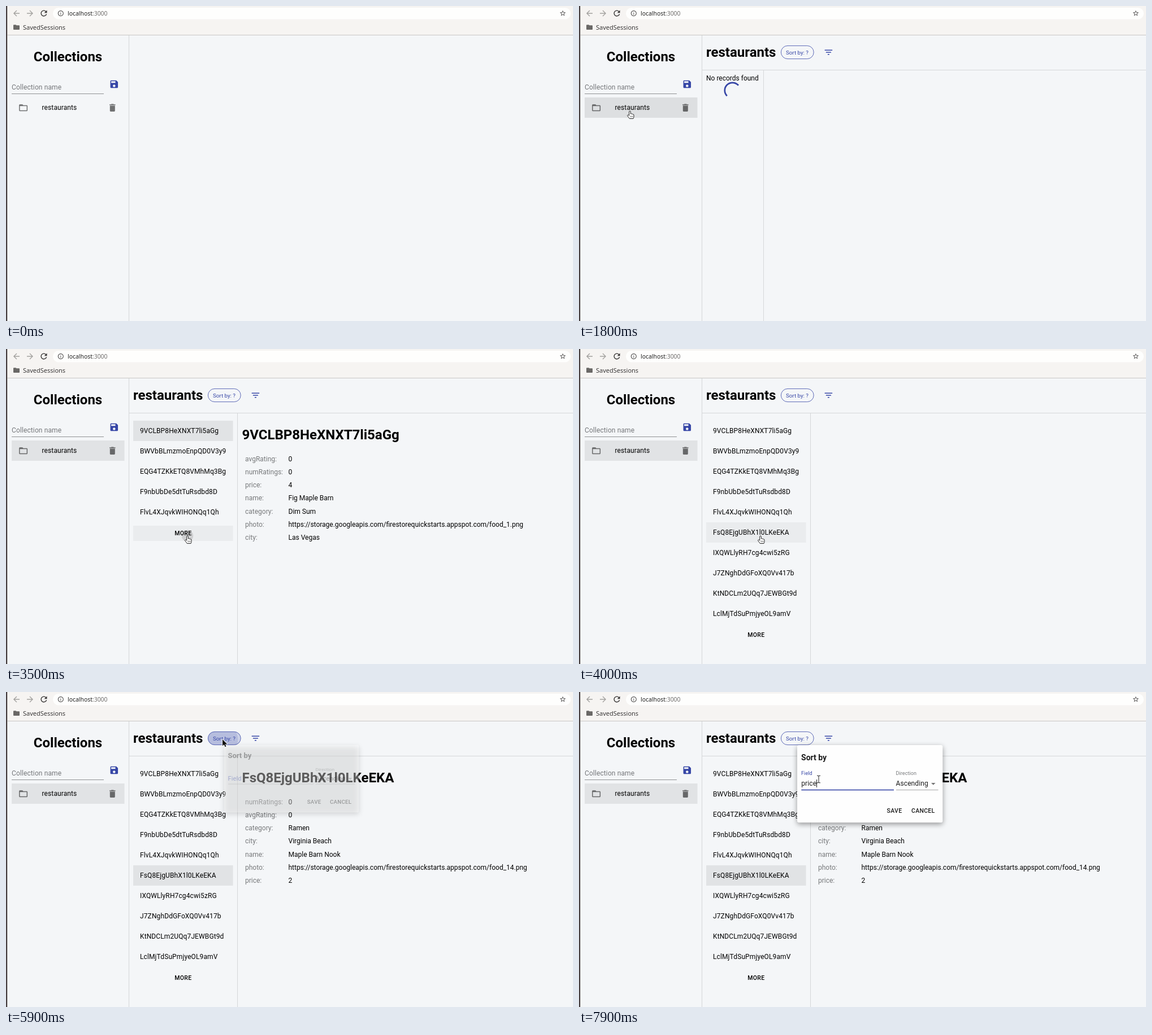
Animation of 1003 by 558 pixels, one loop 8 s. Source, as an HTML page with a canvas:

```html
<!DOCTYPE html>
<html lang="en">
<head>
<meta charset="utf-8">
<title>Collections</title>
<style>
html, body { margin: 0; width: 100%; height: 100%; overflow: hidden; background: #f4f6f8; }
canvas { display: block; width: 1003px; height: 558px; }
</style>
</head>
<body>
<canvas id="stage"></canvas>
<script>
const W = 1003, H = 558, LOOP = 8000, STEP = 100;
const PRIMARY = '#3646a6', BG = '#f4f6f8', LINE = '#d5d7d9', MUTED = 'rgba(0,0,0,.54)';
const FONT = 'Roboto, sans-serif', UI = '"Noto Sans", "Open Sans", sans-serif';
const SPACED = 0.1125;

const canvas = document.getElementById('stage');
const ctx = canvas.getContext('2d');
const dpr = window.devicePixelRatio || 1;
canvas.width = W * dpr;
canvas.height = H * dpr;

const ICONS = {
  back: 'M20 11H7.83l5.59-5.59L12 4l-8 8 8 8 1.41-1.41L7.83 13H20v-2z',
  forward: 'M12 4l-1.41 1.41L16.17 11H4v2h12.17l-5.58 5.59L12 20l8-8z',
  reload: 'M17.65 6.35C16.2 4.9 14.21 4 12 4c-4.42 0-7.99 3.58-7.99 8s3.57 8 7.99 8c3.73 0 6.84-2.55 7.73-6h-2.08c-.82 2.33-3.04 4-5.65 4-3.31 0-6-2.69-6-6s2.69-6 6-6c1.66 0 3.14.69 4.22 1.78L13 11h7V4l-2.35 2.35z',
  info: 'M11 17h2v-6h-2v6zm1-15C6.48 2 2 6.48 2 12s4.48 10 10 10 10-4.48 10-10S17.52 2 12 2zm0 18c-4.41 0-8-3.59-8-8s3.59-8 8-8 8 3.59 8 8-3.59 8-8 8zM11 9h2V7h-2v2z',
  star: 'M22 9.24l-7.19-.62L12 2 9.19 8.63 2 9.24l5.46 4.73L5.82 21 12 17.27 18.18 21l-1.63-7.03L22 9.24zM12 15.4l-3.76 2.27 1-4.28-3.32-2.88 4.38-.38L12 6.1l1.71 4.04 4.38.38-3.32 2.88 1 4.28L12 15.4z',
  folder: 'M10 4H4c-1.1 0-1.99.9-1.99 2L2 18c0 1.1.9 2 2 2h16c1.1 0 2-.9 2-2V8c0-1.1-.9-2-2-2h-8l-2-2z',
  folderOpen: 'M20 6h-8l-2-2H4c-1.1 0-1.99.9-1.99 2L2 18c0 1.1.9 2 2 2h16c1.1 0 2-.9 2-2V8c0-1.1-.9-2-2-2zm0 12H4V8h16v10z',
  save: 'M17 3H5c-1.11 0-2 .9-2 2v14c0 1.1.89 2 2 2h14c1.1 0 2-.9 2-2V7l-4-4zm-5 16c-1.66 0-3-1.34-3-3s1.34-3 3-3 3 1.34 3 3-1.34 3-3 3zm3-10H5V5h10v4z',
  trash: 'M6 19c0 1.1.9 2 2 2h8c1.1 0 2-.9 2-2V7H6v12zM19 4h-3.5l-1-1h-5l-1 1H5v2h14V4z',
  filter: 'M10 18h4v-2h-4v2zM3 6v2h18V6H3zm3 7h12v-2H6v2z'
};
for (const k in ICONS) ICONS[k] = new Path2D(ICONS[k]);

const HAND = new Path2D('M-1.3 1.2Q-1.3 0 0 0Q1.3 0 1.3 1.2V5Q2.3 4.2 3.2 5.3Q4.4 4.6 5.2 5.9Q6.9 5.5 7 7.2V10Q7 11.5 6 13.5H-.7Q-2 11.5-4.3 8.6Q-4.8 7.3-3.4 7Q-2.2 7-1.3 8.2Z');
const HAND_LINES = new Path2D('M1 8.5V11.3M2.9 8.5V11.3M4.8 8.5V11.3');
const ARROW = new Path2D('M0 0V11.6L2.7 9.1 4.6 13.2 6.5 12.4 4.7 8.5H8.4Z');
const BEAM = new Path2D('M-3-6.3H-1Q0-6.3 0-5Q0-6.3 1-6.3H3M0-5V5M-3 6.3H-1Q0 6.3 0 5Q0 6.3 1 6.3H3');

const IDS = ['9VCLBP8HeXNXT7li5aGg', 'BWVbBLmzmoEnpQD0V3y9', 'EQG4TZKkETQ8VMhMq3Bg',
  'F9nbUbDe5dtTuRsdbd8D', 'FlvL4XJqvkWIHONQq1Qh', 'FsQ8EjgUBhX1l0LKeEKA',
  'IXQWLlyRH7cg4cwi5zRG', 'J7ZNghDdGFoXQ0Vv417b', 'KtNDCLm2UQq7JEWBGt9d', 'LclMjTdSuPmjyeOL9amV'];
const PHOTO = 'https://storage.googleapis.com/firestorequickstarts.appspot.com/';
const RECORDS = {
  0: { avgRating: 0, numRatings: 0, price: 4, name: 'Fig Maple Barn', category: 'Dim Sum',
    photo: PHOTO + 'food_1.png', city: 'Las Vegas' },
  5: { numRatings: 0, avgRating: 0, category: 'Ramen', city: 'Virginia Beach', name: 'Maple Barn Nook',
    photo: PHOTO + 'food_14.png', price: 2 }
};

// Moments of the story, in ms
const T = { header: 1500, list: 2000, pick1: 2700, more: 3700, pick2: 4500, dialog: 5818, focus: 6500 };

// Pointer path: time, x, y
const PATH = [[500, 150, 93], [600, 143, 110], [700, 130, 135], [800, 114, 152], [900, 97, 176], [1000, 90, 186],
  [1900, 90, 186], [2100, 165, 168], [2300, 285, 149], [2400, 300, 148], [2600, 302, 152], [2700, 320, 195],
  [2800, 332, 242], [2900, 328, 282], [3000, 324, 315], [3200, 321, 335], [3500, 321, 331], [4700, 321, 331],
  [4900, 322, 325], [5000, 342, 230], [5100, 366, 131], [5200, 373, 117], [5400, 382, 91], [5500, 383, 84],
  [6000, 383, 84], [6200, 398, 118], [6400, 424, 154.5]];

const clamp = v => Math.max(0, Math.min(1, v));

// cubic-bezier(x1, 0, x2, 1)
function ease(x, x1 = 0.4, x2 = 0.2) {
  x = clamp(x);
  let lo = 0, hi = 1, s = x;
  for (let i = 0; i < 24; i++) {
    s = (lo + hi) / 2;
    const bx = 3 * (1 - s) * (1 - s) * s * x1 + 3 * (1 - s) * s * s * x2 + s * s * s;
    if (bx < x) lo = s; else hi = s;
  }
  return s * s * (3 - 2 * s);
}

function pointer(t) {
  if (t < 500 || (t >= 6700 && t < 7900)) return null;
  let i = 0;
  while (i < PATH.length - 1 && PATH[i + 1][0] <= t) i++;
  const a = PATH[i], b = PATH[i + 1];
  if (!b) return { x: a[1], y: a[2] };
  const k = (t - a[0]) / (b[0] - a[0]);
  return { x: a[1] + (b[1] - a[1]) * k, y: a[2] + (b[2] - a[2]) * k };
}

const rowCount = t => t < T.list ? 0 : t < T.more ? 5 : 10;
const rowBox = i => [225, 127 + 36 * i, 176.5, 36];
const moreBox = t => [225, 133 + 36 * rowCount(t), 176.5, 27];
const COLLECTION = [10, 162, 199.5, 36], INPUT = [10, 130, 163, 26], CHIP = [357, 70, 58.5, 24];
const FIELD = [393, 148, 164, 26];

function zone(t) {
  const p = pointer(t);
  if (!p) return '';
  const over = ([x, y, w, h]) => p.x >= x && p.x < x + w && p.y >= y && p.y < y + h;
  if (t >= T.dialog) return over(FIELD) ? 'field' : '';
  if (over(INPUT)) return 'input';
  if (over(COLLECTION)) return 'collection';
  if (t >= T.header && over(CHIP)) return 'chip';
  const n = rowCount(t);
  for (let i = 0; i < n; i++) if (over(rowBox(i))) return 'row' + i;
  return n && over(moreBox(t)) ? 'more' : '';
}

const hover = (t, z) => ((zone(t) === z) + (zone(t - STEP) === z)) / 2;

function text(s, x, y, { size = 12, weight = 400, color = '#000', font = FONT, gap = 0, align = 'left' } = {}) {
  ctx.font = `${weight} ${size}px ${font}`;
  ctx.letterSpacing = gap + 'px';
  ctx.textAlign = align;
  ctx.fillStyle = color;
  ctx.fillText(s, x, y);
}

function rect(x, y, w, h, color) {
  ctx.fillStyle = color;
  ctx.fillRect(x, y, w, h);
}

const shade = (box, a) => a > 0 && rect(...box, `rgba(0,0,0,${a})`);

function icon(name, x, y, scale, color) {
  ctx.save();
  ctx.translate(x, y);
  ctx.scale(scale, scale);
  ctx.fillStyle = color;
  ctx.fill(ICONS[name], 'evenodd');
  ctx.restore();
}

function pill(x, y, w, h, r) {
  ctx.beginPath();
  ctx.roundRect(x, y, w, h, r);
}

function ripple(t, start, cx, cy, box, color = '#000', radius = 0) {
  const age = t - start;
  if (age < 0 || age > 650) return;
  const [x, y, w, h] = box;
  const grow = ease(age / 550);
  const full = Math.hypot(Math.max(cx - x, x + w - cx), Math.max(cy - y, y + h - cy));
  ctx.save();
  pill(x, y, w, h, radius);
  ctx.clip();
  ctx.globalAlpha = (0.1 + 0.2 * grow) * (1 - ease((age - 100) / 550));
  ctx.fillStyle = color;
  ctx.beginPath();
  ctx.arc(cx, cy, full * grow, 0, 2 * Math.PI);
  ctx.fill();
  ctx.restore();
}

function drawBrowser() {
  rect(0, 0, W, 51, '#f6f4f2');
  rect(0, 51, W, 1, '#c9c7c5');
  ctx.fillStyle = '#fefefd';
  pill(83, 3, 916, 20.5, 10);
  ctx.fill();
  icon('back', 10.2, 4.7, 0.69, '#a3a19f');
  icon('forward', 34.2, 4.7, 0.69, '#a3a19f');
  icon('reload', 58.7, 4.7, 0.69, '#3a3838');
  icon('info', 90.8, 7, 0.5, '#4c4a4a');
  icon('star', 978.7, 6.6, 0.52, '#4c4a4a');
  text('localhost', 109, 17, { size: 10.4, font: UI, color: '#222' });
  text(':3000', 109 + ctx.measureText('localhost').width, 17, { size: 10.4, font: UI, color: '#6f6d6c' });
  icon('folder', 11.9, 31, 0.55, '#6a6866');
  text('SavedSessions', 30, 41.5, { size: 11, font: UI, color: '#3a3838' });
}

function drawSidebar(t) {
  rect(217, 52, 1, H, LINE);
  text('Collections', 109.5, 98, { size: 24, weight: 700, align: 'center' });
  text('Collection name', 10, 148, { color: '#75777a', gap: SPACED });
  if (zone(t) === 'input') rect(10, 154.5, 163, 1.5, '#222');
  else rect(10, 155, 163, 1, '#8f9193');
  icon('save', 182.3, 129.4, 0.75, PRIMARY);
  shade(COLLECTION, t >= 1400 ? 0.08 : 0.04 * hover(t, 'collection'));
  ripple(t, 1300, 90, 186, COLLECTION);
  icon('folderOpen', 21.6, 171.3, 0.75, MUTED);
  text('restaurants', 63.5, 184, { gap: SPACED });
  icon('trash', 179.3, 171.2, 0.75, MUTED);
}

function drawHeader(t) {
  rect(218, 113, W, 1, LINE);
  text('restaurants', 225, 90, { size: 24, weight: 700 });
  const active = t >= 5700 && t < 6200 ? 0.2 : 0.06 * hover(t, 'chip');
  pill(357.4, 70.4, 57.8, 23.2, 11.6);
  ctx.globalAlpha = active;
  ctx.fillStyle = PRIMARY;
  ctx.fill();
  ctx.globalAlpha = 1;
  ripple(t, 5630, 384, 84, CHIP, PRIMARY, 12);
  pill(357.4, 70.4, 57.8, 23.2, 11.6);
  ctx.strokeStyle = PRIMARY;
  ctx.lineWidth = 0.8;
  ctx.stroke();
  text('Sort by: ?', 366, 86, { size: 9.75, color: PRIMARY });
  icon('filter', 432.4, 73, 0.75, PRIMARY);
}

function drawLoading(t) {
  rect(326, 114, 1, H, LINE);
  text('No records found', 225, 132);
  const dt = Math.min(t, 1800) - 1800, deg = Math.PI / 180;
  const from = 135 + 0.3 * dt, sweep = 185 + 0.4 * dt;
  ctx.strokeStyle = PRIMARY;
  ctx.lineWidth = 2.7;
  ctx.beginPath();
  ctx.arc(271.5, 149.5, 13.7, from * deg, (from + sweep) * deg);
  ctx.stroke();
}

function selected(t) {
  if (t >= T.pick2) return 5;
  return t >= T.pick1 && t < T.more ? 0 : -1;
}

function drawList(t) {
  rect(409, 114, 1, H, LINE);
  const sel = selected(t), n = rowCount(t);
  for (let i = 0; i < n; i++) {
    shade(rowBox(i), i === sel ? 0.08 : 0.04 * hover(t, 'row' + i));
    if (i === 0) ripple(t, 2500, 300, 148, rowBox(0));
    if (i === 5) ripple(t, 4300, 321, 331, rowBox(5));
    text(IDS[i], 237, 149 + 36 * i, { gap: SPACED });
  }
  const box = moreBox(t);
  shade(box, 0.04 * hover(t, 'more'));
  ripple(t, 3400, 321, box[1] + 18, box, '#000', 3);
  text('MORE', 313.4, box[1] + 17.4, { size: 10.5, weight: 500, gap: 0.3, align: 'center' });
}

function drawRecord(id) {
  text(IDS[id], 417.5, 159.5, { size: 24, weight: 700 });
  Object.entries(RECORDS[id]).forEach(([key, value], i) => {
    const y = 198.5 + 23.27 * i;
    text(key + ':', 423, y, { color: '#77797b' });
    text(String(value), 499.5, y);
  });
}

function typed(t) {
  return 'price'.slice(0, t < 7300 ? 0 : t < 7500 ? 2 : t < 7700 ? 4 : 5);
}

function drawDialog(t) {
  const age = t - T.dialog;
  const grow = ease(age / 183);
  ctx.save();
  ctx.globalAlpha = ease(age / 275);
  ctx.translate(386, 94);
  ctx.scale(0.75 + 0.25 * grow, 0.5625 + 0.4375 * grow);
  ctx.translate(-386, -94);

  ctx.save();
  ctx.shadowColor = 'rgba(0,0,0,.4)';
  ctx.shadowBlur = 10 * dpr;
  ctx.shadowOffsetY = 3 * dpr;
  ctx.fillStyle = '#fefefe';
  pill(386, 94, 257.3, 137.3, 3);
  ctx.fill();
  ctx.restore();

  text('Sort by', 393, 121, { size: 14.04, weight: 700, color: '#1c1c1c' });
  const f = ease((t - T.focus) / 200, 0, 0.2);
  text('Field', 393, 166 - 19.5 * f, { size: 12 - 3 * f, color: f > 0 ? PRIMARY : '#77797b', gap: SPACED });
  rect(393.5, 173, 163.5, 0.8, '#8f8f8f');
  rect(475.2 - 81.8 * f, 172.7, 163.6 * f, 1.6, PRIMARY);

  text('Direction', 560.5, 146.5, { size: 9, color: '#77797b', gap: 0.08 });
  text('Ascending', 560.5, 166, { gap: SPACED, color: '#1c1c1c' });
  ctx.fillStyle = '#757575';
  ctx.beginPath();
  ctx.moveTo(623, 161);
  ctx.lineTo(630.5, 161);
  ctx.lineTo(626.75, 164.8);
  ctx.fill();
  rect(561, 173, 74.5, 0.8, '#8f8f8f');

  const button = { size: 10.5, weight: 500, gap: 0.3, color: '#1c1c1c' };
  text('SAVE', 544.5, 214, button);
  text('CANCEL', 588, 214, button);

  const word = typed(t);
  text(word, 393.2, 166, { gap: SPACED, color: '#1c1c1c' });
  const caretOn = (t >= 6600 && t < 7100) || t >= 7300;
  if (caretOn) rect(393 + Math.round(ctx.measureText(word).width), 155, 1, 14, '#222');
  ctx.restore();
}

function drawPointer(t) {
  const p = pointer(t);
  if (!p) return;
  const z = zone(t);
  ctx.save();
  ctx.translate(p.x, p.y);
  ctx.lineJoin = 'round';
  if (z === 'input' || z === 'field') {
    ctx.strokeStyle = 'rgba(255,255,255,.8)';
    ctx.lineWidth = 2.4;
    ctx.stroke(BEAM);
    ctx.strokeStyle = '#222';
    ctx.lineWidth = 1;
    ctx.stroke(BEAM);
  } else if (z) {
    ctx.fillStyle = '#fff';
    ctx.strokeStyle = '#222';
    ctx.lineWidth = 1;
    ctx.fill(HAND);
    ctx.stroke(HAND);
    ctx.lineWidth = 0.6;
    ctx.stroke(HAND_LINES);
  } else {
    ctx.strokeStyle = '#fff';
    ctx.lineWidth = 1.6;
    ctx.stroke(ARROW);
    ctx.fillStyle = '#111';
    ctx.fill(ARROW);
  }
  ctx.restore();
}

function draw(t) {
  ctx.setTransform(dpr, 0, 0, dpr, 0, 0);
  rect(0, 0, W, H, BG);
  drawBrowser();
  drawSidebar(t);
  if (t >= T.header) drawHeader(t);
  if (t >= T.list) drawList(t);
  else if (t >= T.header) drawLoading(t);
  const sel = selected(t);
  if (sel >= 0) drawRecord(sel);
  if (t >= T.dialog) drawDialog(t);
  drawPointer(t);
  rect(0, 0, 2, H, '#463f40');
  rect(2, 0, 0.6, H, '#b5b1b0');
}

function tick() {
  const t = performance.now() % LOOP;
  draw(Math.floor(t / STEP) * STEP);
  requestAnimationFrame(tick);
}
tick();
</script>
</body>
</html>
```
